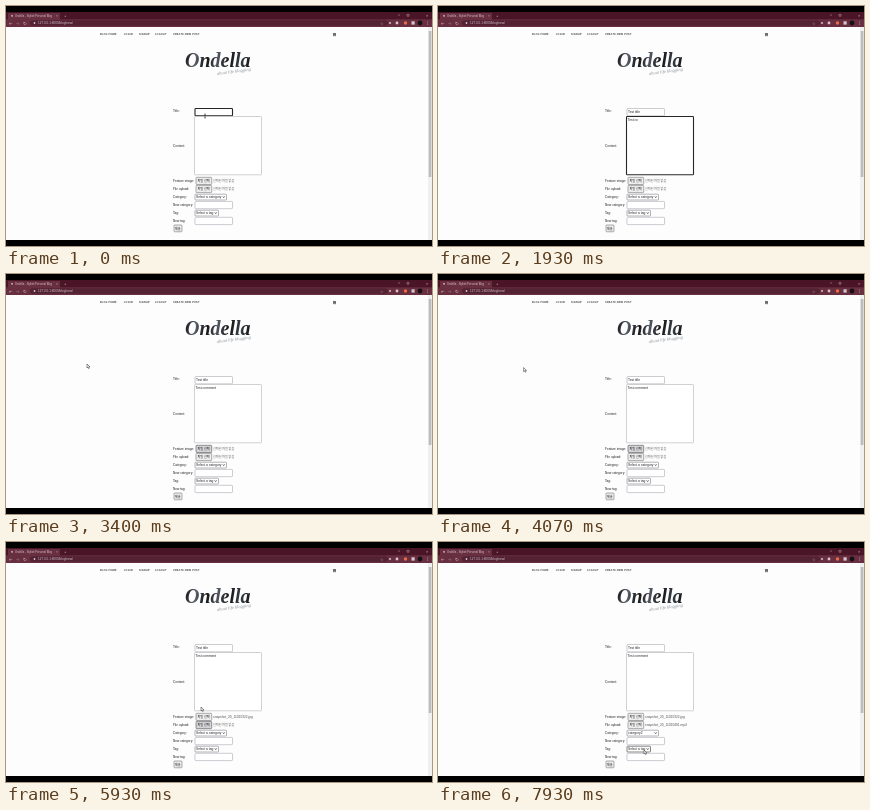
Write an HTML page with a canvas that moves like this. It is 426x240 px and loops after 8000 ms.

```html
<!DOCTYPE html>
<html lang="en">
<head>
<meta charset="utf-8">
<title>New post form</title>
<style>
html, body { margin: 0; width: 100%; height: 100%; overflow: hidden; background: #000; }
canvas { display: block; width: 100vw; height: 100vh; }
</style>
</head>
<body>
<canvas id="stage"></canvas>
<script>
const W = 426, H = 240, LOOP = 8000;
const SANS = '"Liberation Sans", Arial, sans-serif';
const KOREAN = '"Noto Sans CJK KR", "Noto Sans CJK", sans-serif';
const SERIF = '"Liberation Serif", serif';
const canvas = document.getElementById('stage');
const ctx = canvas.getContext('2d');

// Pointer path: time, x, y
const path = [
  [0, 199, 110], [700, 199, 110], [950, 241, 130], [2350, 241, 130],
  [2800, 198, 175], [2950, 198, 175], [3350, 81, 91], [4000, 81, 91],
  [4600, 201, 184], [4950, 201, 184], [5250, 81, 91], [5600, 81, 91],
  [5930, 195, 166], [6350, 205, 191], [7200, 205, 191], [7800, 206, 209], [LOOP, 206, 209]
];

function rect(x, y, w, h, color) {
  ctx.fillStyle = color;
  ctx.fillRect(x, y, w, h);
}

function box(x, y, w, h, border, fill = '#fff', line = 0.6) {
  ctx.beginPath();
  ctx.roundRect(x, y, w, h, 0.8);
  ctx.fillStyle = fill;
  ctx.fill();
  ctx.strokeStyle = border;
  ctx.lineWidth = line;
  ctx.stroke();
}

function text(str, x, y, size, color = '#222', family = SANS, style = '', spacing = 0) {
  ctx.font = `${style} ${size}px ${family}`;
  ctx.letterSpacing = spacing + 'px';
  ctx.fillStyle = color;
  ctx.fillText(str, x, y);
}

function stroke(points, color, width = 0.6) {
  ctx.beginPath();
  points.forEach(([x, y], i) => i ? ctx.lineTo(x, y) : ctx.moveTo(x, y));
  ctx.strokeStyle = color;
  ctx.lineWidth = width;
  ctx.stroke();
}

function dot(x, y, r, color) {
  ctx.beginPath();
  ctx.arc(x, y, r, 0, 7);
  ctx.fillStyle = color;
  ctx.fill();
}

function typed(str, t, start, end) {
  const part = Math.max(0, Math.min(1, (t - start) / (end - start)));
  return str.slice(0, Math.round(part * str.length));
}

function drawBrowser() {
  const pale = '#d8c3ca';
  rect(0, 0, W, H, '#000');
  rect(0, 6, W, 8, '#4b1528');
  rect(2, 7, 52, 7, '#682f40');
  rect(0, 13.3, W, 7.7, '#682f40');
  dot(6, 9.8, 0.9, pale);
  text('Ondella - Stylish Personal Blog', 9, 11, 2.7, pale);
  text('×', 50, 11, 3, pale);
  text('+', 58, 11.2, 4, pale);
  stroke([[392, 9], [394, 9]], pale, 0.4);
  stroke([[401, 8.5], [403, 8.5], [403, 10.2], [401, 10.2], [401, 8.5]], pale, 0.4);
  text('×', 420, 11, 4, pale);
  text('←', 2.5, 18.5, 4.5, pale, 'Inter, sans-serif');
  text('→', 9.5, 18.5, 4.5, '#a37c89', 'Inter, sans-serif');
  text('↻', 17, 18.6, 4.5, pale, '"DejaVu Sans", sans-serif');
  ctx.beginPath();
  ctx.roundRect(24, 14.3, 358, 5.4, 2.7);
  ctx.fillStyle = '#532334';
  ctx.fill();
  dot(28.5, 17, 0.9, pale);
  text('127.0.0.1:8000/blog/new/', 32, 18.1, 3.1, pale);
  text('☆', 374, 18.6, 4, pale, '"DejaVu Sans", sans-serif');
  dot(384, 17, 1, pale);
  dot(391, 17, 1.4, pale);
  dot(399.5, 17, 1.7, '#ef6c45');
  rect(405.5, 15.3, 3.2, 3.3, pale);
  dot(414, 17, 2.4, '#161016');
  [15.7, 17, 18.3].forEach(y => dot(421.5, y, 0.4, pale));
  rect(0, 21, W, 213, '#fdfdfe');
  rect(422, 21, 4, 213, '#f0f0f1');
  rect(422.7, 25, 2.7, 146, '#bcbcbf');
}

function drawHeader() {
  const nav = [['BLOG HOME', 94], ['LOGIN', 118], ['SIGNUP', 133], ['LOGOUT', 149], ['CREATE NEW POST', 167]];
  nav.forEach(([label, x]) => text(label, x, 29.2, 2.5, '#333', 'Inter, sans-serif', '600', 0.2));
  [27.2, 28.3, 29.4].forEach(y => rect(327, y, 3, 0.7, '#333'));

  const ink = ctx.createLinearGradient(179, 48, 244, 62);
  ['#111', '#59616b', '#111', '#4d5560', '#111', '#3a4148', '#111']
    .forEach((c, i) => ink.addColorStop(i / 6, c));
  text('Ondella', 179, 61, 20, ink, SERIF, 'italic bold');

  ctx.save();
  ctx.translate(211, 69);
  ctx.rotate(-0.13);
  text('about life blogging', 0, 0, 4.5, '#89939a', SERIF, 'italic');
  ctx.restore();
}

function drawInput(y, value = '', focused = false) {
  box(189, y, 37.5, 7.3, focused ? '#292523' : '#aaaab2', '#fff', focused ? 1.1 : 0.6);
  text(value, 190, y + 4.8, 3.3);
}

function drawFile(y, name, active) {
  box(190, y, 15.7, 7.2, active ? '#555' : '#777', active ? '#d5d5d9' : '#eeeeef');
  text('파일 선택', 191.5, y + 4.8, 3.1, '#111', KOREAN);
  if (name) text(name, 207, y + 4.7, 3.25, '#555');
  else text('선택된 파일 없음', 207, y + 4.7, 3.1, '#666', KOREAN);
}

function drawSelect(y, width, value, focused) {
  box(189, y, width, 5.8, focused ? '#333' : '#808086');
  text(value, 190, y + 4.1, 3.3);
  const x = 189 + width - 2.8;
  stroke([[x - 1, y + 2.2], [x, y + 3.4], [x + 1, y + 2.2]], '#222', 0.7);
}

function drawForm(t) {
  const labels = [['Title:', 106], ['Content:', 141], ['Feature image:', 176], ['File upload:', 184],
    ['Category:', 191.5], ['New category:', 199.7], ['Tag:', 207.8], ['New tag:', 216]];
  labels.forEach(([label, y]) => text(label, 167, y, 3.15));

  const onTitle = t < 1000, onContent = t >= 1000 && t < 2600;
  drawInput(102.5, typed('Test title', t, 150, 850), onTitle);
  box(188.5, 110.5, 67, 58.3, onContent ? '#292725' : '#b2b2b8', '#fff', onContent ? 1.1 : 0.6);
  const comment = typed('Test comment', t, 1350, 2350);
  text(comment, 189.5, 114.8, 3.3);
  if (onContent && t % 1060 < 530) {
    const x = 190 + ctx.measureText(comment).width;
    stroke([[x, 112], [x, 115.5]], '#222', 0.4);
  }

  drawFile(171.3, t >= 4100 ? 'snapshot_20_11010322.jpg' : '', t >= 2900 && t < 4650);
  drawFile(179.4, t >= 6150 ? 'snapshot_20_11010401.mp4' : '', t >= 4650 && t < 6500);
  drawSelect(188.2, 31.5, t >= 7200 ? 'category2' : 'Select a category', t >= 6500 && t < 7900);
  drawInput(195.4);
  drawSelect(204.2, 23.5, 'Select a tag', t >= 7900);
  drawInput(211.3);
  box(168, 219, 8, 6.8, '#777', '#eeeeef');
  text('제출', 169, 223.6, 3.1, '#111', KOREAN);
}

function pointerAt(t) {
  const i = path.findIndex(([time], n) => t < path[n + 1][0]);
  const [t0, x0, y0] = path[i], [t1, x1, y1] = path[i + 1];
  const p = (t - t0) / (t1 - t0), ease = p * p * (3 - 2 * p);
  return [x0 + (x1 - x0) * ease, y0 + (y1 - y0) * ease];
}

function drawPointer(t) {
  if (t > 1350 && t < 2780) return;
  const [x, y] = pointerAt(t);
  if (t < 1350) {
    stroke([[x, y - 2], [x, y + 2]], '#222');
    [-2, 2].forEach(d => stroke([[x - 0.8, y + d], [x + 0.8, y + d]], '#222', 0.5));
    return;
  }
  ctx.beginPath();
  [[0, 0], [0, 4], [0.9, 3.2], [1.6, 4.6], [2.3, 4.2], [1.6, 2.9], [2.9, 2.8]]
    .forEach(([dx, dy]) => ctx.lineTo(x + dx, y - 1 + dy));
  ctx.closePath();
  ctx.fillStyle = '#fff';
  ctx.fill();
  ctx.strokeStyle = '#222';
  ctx.lineWidth = 0.5;
  ctx.stroke();
}

function resize() {
  const ratio = devicePixelRatio || 1;
  const w = Math.round(innerWidth * ratio), h = Math.round(innerHeight * ratio);
  if (canvas.width !== w || canvas.height !== h) {
    canvas.width = w;
    canvas.height = h;
  }
  ctx.setTransform(w / W, 0, 0, h / H, 0, 0);
}

function frame() {
  const t = performance.now() % LOOP;
  resize();
  drawBrowser();
  drawHeader();
  drawForm(t);
  drawPointer(t);
  requestAnimationFrame(frame);
}
frame();
</script>
</body>
</html>
```
